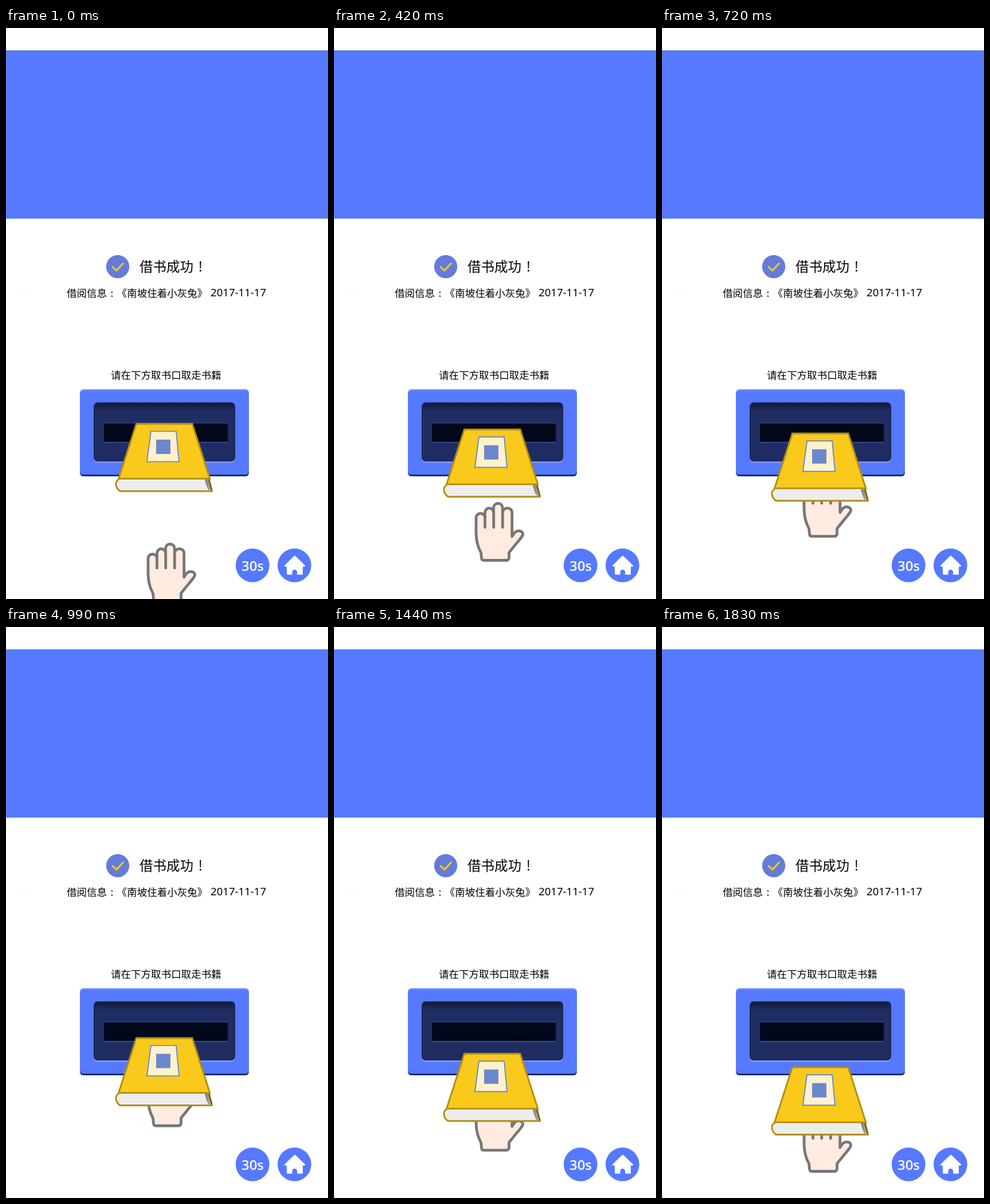
These frames come from a looping animation (562 px wide and 996 px high, 1.86 s). An HTML page:

```html
<!DOCTYPE html>
<html lang="zh-CN">
<head>
<meta charset="utf-8">
<title>借书成功</title>
<style>
html, body { margin: 0; width: 100%; height: 100%; overflow: hidden; background: #fff; }
svg { display: block; width: 100vw; height: 100vh; }
text { font-family: "Noto Sans CJK SC", "Noto Sans CJK", "Noto Sans", sans-serif; font-weight: 350; fill: #000; }
.mid { text-anchor: middle; }
.line { font-size: 17.55px; }
.latin { font-family: "Noto Sans", "Open Sans", sans-serif; font-weight: 400; }
.timer { font: 600 24px "Open Sans", "Noto Sans", sans-serif; fill: #fff; }
</style>
</head>
<body>
<svg viewBox="0 0 562 996" xmlns="http://www.w3.org/2000/svg">
  <defs>
    <linearGradient id="recess" x2="0" y2="1">
      <stop offset="0" stop-color="#11193c"/>
      <stop offset=".13" stop-color="#202d62"/>
      <stop offset="1" stop-color="#202d62"/>
    </linearGradient>
    <linearGradient id="edge">
      <stop offset="0" stop-color="#777"/>
      <stop offset="1" stop-color="#b5b5b5"/>
    </linearGradient>
  </defs>

  <rect y="39" width="562" height="293.5" fill="#5579ff"/>
  <rect x="28" y="463" width="6" height="1" fill="#ededed"/>

  <circle cx="195" cy="416.3" r="20.2" fill="#647bda"/>
  <path d="M186 416.5l6.8 6.8 11.8-12.8" fill="none" stroke="#fbc91c" stroke-width="3" stroke-linecap="round" stroke-linejoin="round"/>
  <text x="233" y="424.7" font-size="23.5">借书成功</text>
  <text class="mid" x="339.5" y="424.7" font-size="24">!</text>

  <text class="line" x="106" y="468.7">借阅信息</text>
  <text class="line mid" x="185" y="468.7">:</text>
  <text class="line" x="193.6" y="468.7">《南坡住着小灰兔》</text>
  <text class="latin" x="357" y="468.3" font-size="18.6">2017-11-17</text>

  <text class="line" x="183" y="612.3">请在下方取书口取走书籍</text>

  <g id="slot">
    <rect x="129" y="636" width="295" height="146" rx="6" fill="#1b2a63"/>
    <rect x="129" y="630" width="295" height="149" rx="6" fill="#7b96ff"/>
    <rect x="129" y="632.5" width="295" height="146.5" rx="6" fill="#5579ff"/>
    <rect x="153" y="656" width="247" height="102.5" rx="7" fill="#7f99ff"/>
    <rect x="153" y="653" width="247" height="103" rx="7" fill="#1a2550"/>
    <rect x="155" y="655" width="243.5" height="100" rx="6" fill="url(#recess)"/>
    <rect x="171" y="688.5" width="216" height="35" fill="#40549f"/>
    <rect x="171" y="689.5" width="216" height="32.5" fill="#02081a"/>
  </g>

  <g id="hand" stroke="#777" stroke-width="4.8" stroke-linecap="round" stroke-linejoin="round">
    <path fill="#ffebe0" d="M248 854a7.7 7.2 0 0 1 15.5 0V845a7.5 7.5 0 0 1 15 0V837a7.8 7.8 0 0 1 15.8 0V845a8 7.5 0 0 1 16.4 0V887L315 880.5C321 873.5 333 878.5 328.6 886Q327 889 318 899.5L305.5 915V924Q305 928.5 301 928.5H261.500Q258 928.5 257.5 925L256.500 915Q248 900 248 880Z"/>
    <path fill="none" d="M263.5 850V871M278.7 842V871M294.3 842V871"/>
  </g>

  <g id="book">
    <path d="M197 787C190 791 190 801 199 808H359.5L355 786Z" fill="#fbfbfb"/>
    <g id="pages" stroke="#d0d0d0"></g>
    <path d="M347 787.5H355L358.5 806H353Q349 798 347 787.5Z" fill="url(#edge)"/>
    <path d="M354 786.5L359.5 808" stroke="#7d620c" stroke-width="3"/>
    <path d="M197 787C190 791 190 801 199 808H360.5" fill="none" stroke="#b38f10" stroke-width="3"/>
    <path d="M227.5 690.5H325L355.8 786.3H196.5Z" fill="#f9c91c" stroke="#b38f10" stroke-width="3"/>
    <path d="M253 703.5H297L302 756.5H246Z" fill="#fef2cd" stroke="#5b80d6" stroke-width="1.7"/>
    <rect x="262" y="718" width="25" height="25" fill="#6c88cc"/>
  </g>

  <circle cx="430.3" cy="937.3" r="29.4" fill="#5579ff"/>
  <text class="timer mid" x="430.5" y="946.8">30s</text>
  <circle cx="503.4" cy="937.3" r="29.4" fill="#5579ff"/>
  <path d="M504 922L520.5 938H516.5V952H491.5V938H487.5Z" fill="#fff" stroke="#fff" stroke-width="3" stroke-linejoin="round"/>
  <path d="M499.5 954V949a4.3 4.3 0 0 1 8.6 0V954Z" fill="#5579ff"/>
</svg>
<script>
const STEP = 30, COUNT = 62;
// [step, vertical offset]
const bookKeys = [[0, 0], [30, 21], [61, 77.6]];
const handKeys = [[0, 71], [14, 0], [30, -67], [61, 21]];
const book = document.getElementById('book');
const hand = document.getElementById('hand');
const pages = document.getElementById('pages');

for (let y = 790.5; y < 806; y += 3) {
  const line = document.createElementNS('http://www.w3.org/2000/svg', 'path');
  const inset = Math.abs(y - 797) * 0.25;
  line.setAttribute('d', `M${194 + inset} ${y}H${347 + (y - 787) * 0.3}`);
  pages.append(line);
}

function valueAt(keys, n) {
  const i = Math.max(1, keys.findIndex(k => k[0] >= n));
  const [a, from] = keys[i - 1], [b, to] = keys[i];
  return from + (to - from) * (n - a) / (b - a);
}

const place = (el, y) => el.setAttribute('transform', `translate(0 ${y.toFixed(2)})`);

const start = performance.now();
function draw() {
  const n = Math.floor((performance.now() - start) / STEP) % COUNT;
  place(book, valueAt(bookKeys, n));
  place(hand, valueAt(handKeys, n));
  requestAnimationFrame(draw);
}
draw();
</script>
</body>
</html>
```
